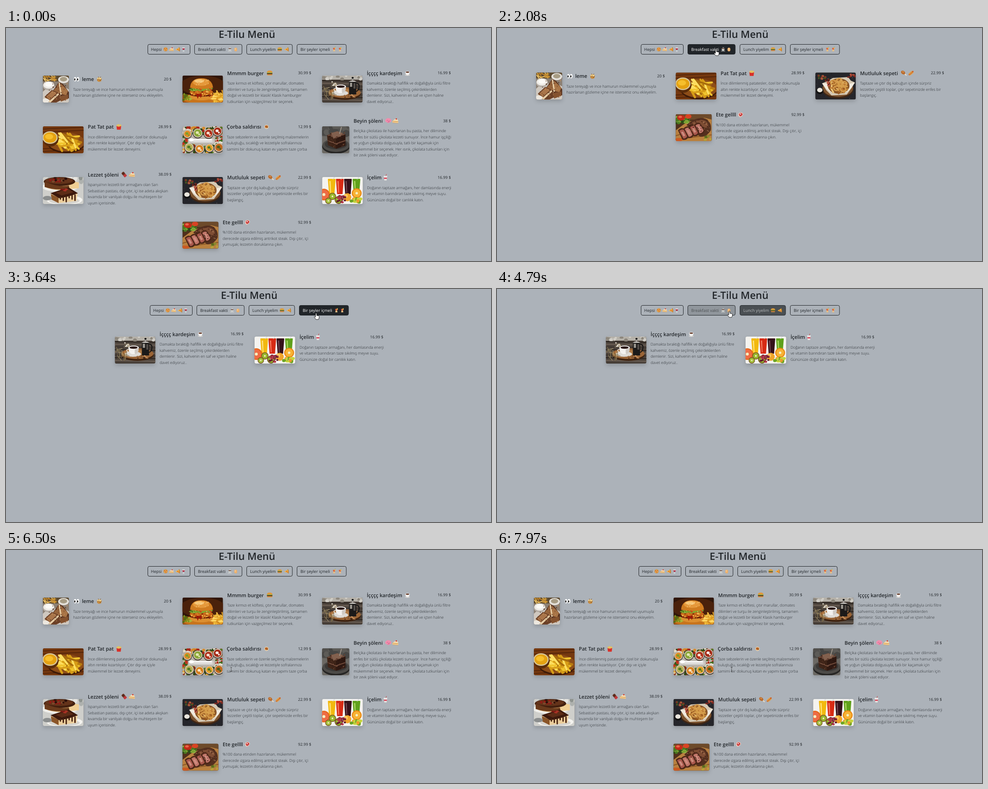
Animation of 1079x519 px, one loop 8 s. Source, as an HTML page:

```html
<!DOCTYPE html>
<html lang="tr">
<head>
<meta charset="utf-8">
<title>Menü</title>
<style>
html, body { margin: 0; width: 100%; height: 100%; overflow: hidden; background: #acb2b9; }
svg { display: block; }
text { font-family: "Open Sans", "Noto Sans", sans-serif; fill: #212529; text-rendering: geometricPrecision; }
.title { font-size: 22.4px; font-weight: 600; text-anchor: middle; }
.name { font-size: 11.2px; font-weight: 600; }
.price { font-size: 8.7px; text-anchor: end; }
.line { font-size: 8.53px; font-weight: 300; }
.btn { font-size: 9px; }
.shadow { filter: drop-shadow(0 4.5px 4.5px rgba(0, 0, 0, .17)); }
</style>
</head>
<body>
<svg id="stage" width="1079" height="519" viewBox="0 0 1079 519"></svg>
<script>
const LOOP = 8000, INK = [33, 37, 41];
const $ = id => document.getElementById(id);

// Shape helpers
const E = (x, y, rx, ry, c) => `<ellipse cx="${x}" cy="${y}" rx="${rx}" ry="${ry}" fill="${c}"/>`;
const R = (x, y, w, h, c, r = 0) => `<rect x="${x}" y="${y}" width="${w}" height="${h}" rx="${r}" fill="${c}"/>`;
const P = (d, c) => `<path d="${d}" fill="${c}"/>`;
const S = (d, c, w) => `<path d="${d}" fill="none" stroke="${c}" stroke-width="${w}" stroke-linecap="round"/>`;
const rng = s => () => (s = (s * 16807) % 2147483647) / 2147483647;

function dots(n, x, y, w, h, r, colors, seed) {
  const rnd = rng(seed * 7919);
  let out = '';
  for (let i = 0; i < n; i++)
    out += E((x + rnd() * w).toFixed(1), (y + rnd() * h).toFixed(1), r * (.6 + rnd() * .6), r * (.5 + rnd() * .5), colors[i % colors.length]);
  return out;
}
// Short bars centred in a box, turned between angles a and b
function sticks(n, x, y, w, h, len, colors, width, seed, a = -.5, b = 1.9) {
  const rnd = rng(seed * 7919);
  let out = '';
  for (let i = 0; i < n; i++) {
    const turn = a + rnd() * (b - a), dx = Math.cos(turn) * len, dy = Math.sin(turn) * len;
    out += S(`M${(x + rnd() * w - dx / 2).toFixed(1)} ${(y + rnd() * h - dy / 2).toFixed(1)}l${dx.toFixed(1)} ${dy.toFixed(1)}`, colors[i % colors.length], width);
  }
  return out;
}
const bowl = (x, y, r, c, top) => E(x, y + 1, r + 1, r + 1, '#4a4038') + E(x, y, r, r, '#dcd2c4') + E(x, y, r * .84, r * .82, c) + E(x - 1, y - 1, r * .35, r * .3, top) + E(x + r * .3, y + r * .3, r * .2, r * .2, top);
const glass = (x, c, light) => P(`M${x} 6h17l-2.5 32h-12z`, c) + P(`M${x + 3} 9h3l1 26h-2z`, light) + R(x, 4, 17, 3, c, 1);
const slice = (x, y, r, rim, c) => E(x, y, r, r, rim) + E(x, y, r * .8, r * .8, c) + E(x, y, r * .25, r * .25, '#f6eec0');

const photos = {
  gozleme: R(0, 0, 58, 60, '#8c8074') + R(0, 0, 58, 13, '#5d4a30') + sticks(14, 2, 2, 24, 9, 10, ['#d9a23c', '#b9802a', '#efc568'], 2, 3) +
    E(32, 46, 36, 22, '#cfc8bf') + E(13, 23, 13, 10, '#b5aea6') + E(13, 21, 12, 8, '#eeebe6') + E(13, 20, 8, 5, '#fbfaf6') + E(46, 9, 12, 8, '#e4e0da') + E(46, 8, 8, 5, '#a79c84') +
    P('M18 40l18-26 9 5 13 18v14z', '#5a3420') + P('M22 36l14-20 4 18-8 12z', '#96643c') + P('M40 18l16 16-4 10-14-4z', '#a87446') + P('M35 15l3 1 4 26-3 1z', '#ead2ac') +
    P('M4 47l16-15 14 6 8 16-16 8-16-4z', '#6d4127') + P('M7 47l14-13 10 5-16 15z', '#a9754a') + P('M5 49l11 6 18-16 2 3-19 18-13-6z', '#e6cda6') + P('M38 46l18-4v10l-16 6z', '#84522f') +
    E(6, 56, 8, 5, '#ece7df') + dots(40, 8, 18, 46, 38, 1.3, ['#4a2a17', '#c1915f', '#7a4a2a'], 8),
  burger: R(0, 0, 90, 60, '#2f1508') + E(45, 22, 50, 22, '#4a210b') + R(0, 42, 90, 18, '#9a4f10') + E(50, 54, 50, 8, '#c8741c') + dots(16, 0, 40, 20, 14, 3, ['#7c8f1c', '#a8b53a', '#566a12'], 6) +
    sticks(40, 64, 40, 26, 16, 14, ['#f3c145', '#d9941c', '#ffd869', '#e8ac2e'], 2.8, 12) +
    E(42, 47, 25, 8, '#dc8f30') + E(42, 41, 27, 6, '#5a1c08') + E(42, 37, 26, 7, '#c8691a') + dots(34, 18, 32, 48, 13, 2.4, ['#e39a35', '#b4500f', '#f0b24c', '#8c2b0b'], 5) +
    P('M14 31q8-6 16-2 10 5 20-2 10-3 18 2-8 8-17 3-9 6-17 1-12 5-20-2z', '#83a52c') + dots(14, 16, 28, 50, 4, 1.8, ['#b9c85c', '#d23c1c', '#567a1c'], 3) +
    P('M17 27Q18 6 42 6t26 21q-25 6-51 0z', '#d07c20') + E(41, 15, 18, 8, '#e5983a') + E(37, 12, 11, 4, '#f6c270') + dots(22, 24, 9, 36, 12, .9, ['#fbe4ad'], 4) +
    P('M30 40l4 12 3-9 4 7 2-9z', '#9c1a08'),
  coffee: R(0, 0, 90, 60, '#4b423b') + R(0, 0, 90, 9, '#b5b1a9') + dots(12, 0, 0, 90, 9, 4, ['#8d877d', '#d0cdc6'], 3) +
    Array.from({ length: 9 }, (_, i) => S(`M0 ${11 + i * 6}L90 ${13 + i * 6}`, ['#2c2520', '#6f6257', '#3a322c'][i % 3], 2)).join('') +
    E(50, 41, 36, 13, '#3d2210') + E(50, 38, 36, 12, '#9a6537') + E(44, 36, 24, 7, '#b47f4a') + E(40, 39, 18, 6, '#dedbd6') + P('M30 24h23q0 14-8 15h-7q-8-2-8-15z', '#f3f1ee') + P('M45 24h8q0 14-8 15-2-3 0-15z', '#cfcac4') +
    E(41.5, 24, 11.5, 4, '#fff') + E(41.5, 24.5, 9, 2.7, '#2c1610') + S('M31 28q-6 0-4 5 2 2 5 1', '#eceae6', 1.6) +
    R(60, 14, 16, 28, '#1c1a19', 1) + R(62, 16, 5, 9, '#9a968f') + R(70, 17, 4, 12, '#56514d') + S('M68 13V4', '#aaa', 1.5) + E(68, 5, 2.4, 2, '#111') + P('M59 14q9-7 18 0z', '#c4c1bc') + S('M76 17q8 0 6 10-1 7-6 8', '#111', 2) +
    sticks(14, 4, 28, 24, 22, 14, ['#a08e5e', '#6e5d3c', '#c3b184'], 1, 7) + dots(14, 20, 13, 12, 10, 2, ['#e9e3d6', '#b8a98f', '#6d6150'], 6) + dots(18, 46, 42, 28, 7, 1.3, ['#2b160d', '#d9a26d'], 2),
  fries: R(0, 0, 91, 60, '#75380f') + [6, 13, 50, 56].map(y => S(`M0 ${y}L91 ${y - 4}`, '#4b2008', 1.6)).join('') + E(52, 37, 42, 23, '#3f1b08') + E(52, 35, 41, 21, '#8d4d18') +
    sticks(40, 36, 26, 38, 20, 24, ['#b97c10', '#d79d17', '#e8b822'], 5, 21, -.5, 1.3) + sticks(30, 38, 22, 36, 22, 24, ['#f1c52e', '#a86c0c', '#ffe062', '#d79d17'], 4.2, 25, -.5, 1.3) +
    E(17, 28, 18, 17, '#5a2c0b') + E(16, 25, 17, 14, '#d8c79a') + E(16, 25, 14.5, 11.5, '#e5a212') + E(14, 23, 9, 6, '#f6bf2c'),
  soups: R(0, 0, 89, 60, '#b9b4ac') + dots(70, 0, 0, 89, 18, 4, ['#4f7a22', '#a9281a', '#274415', '#d58b2c', '#e2d9c8'], 9) + dots(70, 0, 42, 89, 18, 4, ['#87301a', '#5b8425', '#e0a23b', '#2f4b18', '#d9cfbd'], 11) +
    dots(24, 0, 20, 10, 22, 3, ['#36591a', '#c2321e', '#7f9a34'], 13) + dots(24, 74, 22, 15, 22, 3, ['#b12c1d', '#436b1e', '#ece6d8'], 14) +
    bowl(11, 17, 9, '#dd8c27', '#7a9e2c') + bowl(34, 15, 10, '#8ba83a', '#e3e7b2') + bowl(58, 16, 10, '#b0321c', '#f4dfd0') + bowl(78, 11, 10, '#a42a16', '#f6efe8') +
    bowl(15, 47, 10, '#b9b05c', '#4f7a22') + bowl(38, 50, 10, '#d67f1f', '#f3e2c4') + bowl(60, 48, 9, '#e4a22d', '#4f7a22') + bowl(81, 47, 10, '#c26a1e', '#4a621b') +
    R(14, 28, 56, 9, '#cfccc8') + R(16, 28.5, 50, 3, '#fcfcfc', 1.5) + R(24, 33, 42, 2, '#e4e4e4', 1) + E(20, 30, 6, 3.4, '#fff'),
  cake: R(0, 0, 61, 60, '#6b6863') + R(0, 0, 61, 22, '#514f4c') + dots(12, 0, 0, 61, 16, 8, ['#5d5b57', '#474644'], 5) + E(31, 45, 31, 16, '#262524') + E(31, 42, 30, 15, '#4d4b48') + E(31, 40, 25, 11, '#3a3836') +
    P('M11 20l22-9 19 7v25l-21 7-18-8z', '#3e2418') + P('M11 20l22-9 19 7-21 9z', '#6d4a3a') + P('M31 27l21-9v25l-21 7z', '#2f1912') + S('M13 32l18 7 20-7', '#7d5544', 1.8) +
    dots(46, 14, 14, 36, 32, 1.4, ['#2a140c', '#68432f', '#4d2d20'], 16) + P('M20 15l14-4 12 4-6 8-8-1-6 6z', '#82604e') + S('M43 2l-4 14', '#9a9287', 2),
  cheesecake: R(0, 0, 91, 60, '#cfcfcb') + dots(16, 0, 0, 91, 13, 7, ['#e6e5e0', '#aeb1ae', '#8f9490'], 4) + E(38, 22, 40, 11, '#efeeea') + P('M4 10h68v12q-34 14-68 0z', '#d9ab6c') + P('M58 8l22 4v13l-22 2z', '#f0cf94') +
    E(37, 10, 35, 10, '#43200f') + E(36, 8, 31, 7, '#64331a') + P('M4 10q32 14 54 9l1 6q-30 6-55-3z', '#6a3a1c') + dots(14, 12, 1, 40, 9, 3, ['#8e1d16', '#2d1009', '#7c4a2c'], 18) +
    E(48, 51, 40, 11, '#f4f3ef') + E(48, 53, 34, 7, '#d6d4cf') + P('M18 38l42-10 17 9-2 16-40 5-14-8z', '#ecce9c') + P('M18 38l17 8v12l-16-8z', '#8a5528') + P('M17 36l40-13 21 13q-22 9-42 11z', '#3c190d') + P('M28 35l28-9 12 8-26 7z', '#5c2c17') +
    Array.from({ length: 6 }, (_, i) => S(`M${39 + i * 6.5} ${45 - i}v${4 + i % 3 * 4}`, '#45200f', 3)).join('') + dots(6, 40, 25, 14, 5, 3, ['#7c1a14', '#a83224'], 9) + E(10, 47, 10, 5, '#8b8e8e'),
  basket: R(0, 0, 90, 60, '#25252a') + dots(50, 0, 0, 90, 60, .9, ['#6b6769', '#3a393d', '#151518'], 23) + E(50, 37, 35, 21, '#3f2615') + E(50, 35, 34, 19, '#7d5430') + P('M15 24l10-4 14-8 34-2 6 8 9 4-8 13-10 14-34 2-12-12z', '#d5c9b4') +
    P('M15 24l13 0 6 20-10-8zM88 22l-12 3-8 20 12-10z', '#f2ebdf') + E(52, 30, 24, 17, '#8a5526') + sticks(46, 36, 18, 32, 24, 11, ['#d7a04a', '#9a5a20', '#ebc377', '#c07d34'], 3.4, 27) +
    [[40, 22], [53, 18], [64, 25], [47, 35], [62, 37]].map(([x, y]) => `<ellipse cx="${x}" cy="${y}" rx="6" ry="5" fill="none" stroke="#d39a4a" stroke-width="3"/>`).join('') +
    dots(12, 22, 14, 10, 16, 2.6, ['#8d3223', '#b85843', '#5a1d14'], 2) + E(10, 41, 8, 7, '#111') + E(10, 39, 6, 5, '#e8e4dc') + dots(12, 6, 6, 18, 9, 2.6, ['#803023', '#4a5a22', '#a5563a'], 7) + dots(8, 72, 2, 16, 8, 2.6, ['#7a2a22', '#b54c38'], 6),
  juice: R(0, 0, 91, 60, '#f4f3ef') + glass(13, '#f2b90f', '#ffe27a') + glass(31, '#d72a14', '#f47a5f') + glass(49, '#35111a', '#704450') + glass(68, '#5fa01b', '#a7d45c') + S('M24 5L28 0M42 5l4-5M78 5l4-5', '#cfd6d2', 1.2) +
    slice(4, 39, 13, '#e6691d', '#ee6c45') + slice(23, 43, 8, '#7c5a24', '#98b82d') + slice(37, 51, 9, '#77531f', '#8fb42b') + slice(14, 53, 7, '#77531f', '#a3bf3b') + E(56, 45, 9, 9, '#f1a42a') + E(53, 42, 4, 4, '#f9cb61') + slice(77, 36, 11, '#e98713', '#f8b334') +
    dots(26, 34, 42, 18, 14, 2.6, ['#631b2c', '#87283c', '#b5384a'], 15) + dots(18, 65, 48, 22, 9, 4, ['#c7d43d', '#6da424', '#ef9a2a'], 31),
  steak: R(0, 0, 80, 60, '#4f301c') + R(0, 0, 80, 12, '#6d4a2a') + P('M0 36l24-18 40-10 16 4v48H0z', '#b9803f') + S('M0 56l80-10M0 48l20-6', '#8a5726', 2) +
    dots(34, 0, 6, 30, 14, 4, ['#4b7a20', '#78a22f', '#2d4b15', '#93b54a'], 19) + E(12, 8, 9, 6, '#c22a17') + E(28, 5, 7, 5, '#d84423') + E(10, 6, 4, 2.5, '#e8664a') +
    P('M24 24Q46 4 66 10q15 8 12 26-10 16-24 14z', '#54301f') + P('M34 20q18-11 30-6 10 5 8 16-18 2-38-10z', '#7d4c33') +
    [0, 1, 2, 3].map(i => { const x = 5 + i * 12, y = 36 - i * 4; return P(`M${x} ${y}q8-8 14-3l10 15q-2 11-14 9z`, '#4e2819') + P(`M${x + 3} ${y + 1}q6-5 10-2l8 13q-3 7-9 6z`, i % 2 ? '#c0766a' : '#a9584d') + P(`M${x + 7} ${y + 4}q4-2 5 0l4 7q-2 3-4 2z`, '#cf8d80'); }).join('') +
    dots(50, 30, 12, 46, 28, 1.2, ['#85533a', '#2f130d', '#b98a62', '#3f2015'], 33) + dots(8, 62, 48, 16, 10, 3.5, ['#8c8a2f', '#b9a03c', '#5c6a1e'], 4) + E(6, 57, 9, 4, '#cb5a22')
};

// Small food icons on a 12 unit box
const icons = {
  eyes: [-3, 3].map(x => E(x, 0, 2.7, 4.6, '#fff') + E(x - .8, .5, 1.4, 2.4, '#222')).join(''),
  wrap: P('M-5-1q5-6 10 0l-1 5q-4 3-8 0z', '#c88b3f') + E(0, -1.5, 4.3, 2.4, '#f0d28d') + S('M-4 2l3-3 3 4 2-3M-2-5l1 2M3-5l-1 2', '#7b4a1c', .9),
  burger: P('M-6-1q0-4.5 6-4.5t6 4.5z', '#e09a3c') + R(-6, -1, 12, 1.5, '#6fa32e', .7) + R(-6, .5, 12, 2, '#68301a', 1) + R(-5.5, 2.5, 11, 2.3, '#dd9b45', 1),
  coffee: E(0, 4.3, 5.5, 1.4, '#d2d0cd') + P('M-4.5-2h9q0 6-4.5 6.5-4.5-.5-4.5-6.5z', '#f2f0ee') + E(0, -2, 4.5, 2, '#fff') + E(0, -2, 3.6, 1.4, '#5b2e1b'),
  fries: S('M-3.5-4v4M-1-5v5M1.5-4.5v5M4-4v4', '#f6c744', 1.8) + P('M-5-2q5 3 10 0l-1 8h-8z', '#d92f29'),
  soup: E(0, 0, 4.6, 4.5, '#e7d3b5') + E(0, -.3, 3.5, 3, '#c87b35') + E(-1, -1, 1.2, 1, '#8c2f1c') + E(1.5, .5, 1, .8, '#5d3516'),
  brain: P('M-5.5 2q-2-4 1-5.5 2-3 5.5-2 4 0 5.5 4 1 4.5-3 4.5l-3 2z', '#f08fae') + S('M-3 0q2-3 3 0t4-1M-1 3l4-1', '#c95f86', .8),
  cake: P('M-6 0l8-5 4 4v2z', '#f8e0b6') + P('M-6 0l12 1v4l-12-1z', '#e0a24e') + S('M-6 2.2l12 1', '#fbe9c6', 1.1) + E(2, -4, 1.5, 1.5, '#d43a2c'),
  choc: `<g transform="rotate(-40)">${R(-3, -6, 6, 11, '#6a3422', 1)}${R(-3, 0, 6, 5.5, '#c4393c')}${S('M0-5.5v5M-3-3h6', '#42190e', .7)}</g>`,
  drum: S('M1 1l4 3.5', '#f1e2c7', 1.8) + `<g transform="rotate(35)">${E(-2, 0, 4.8, 3.5, '#b86b2e')}${E(-3, -1, 2, 1.2, '#dc9450')}</g>`,
  dog: `<g transform="rotate(-40)">${R(-6, -2.7, 12, 5.6, '#dea24c', 2.7)}${R(-6.5, -1.2, 13, 2.2, '#bf4e2d', 1)}${S('M-5 0l2-1 2 1 2-1 2 1', '#f5d24e', .7)}</g>`,
  cup: S('M1-4l1-3', '#c33', .9) + P('M-3.5-2h7l-1 8h-5z', '#ece7e4') + R(-3.1, 0, 6.2, 2.8, '#d9485c') + R(-4, -3.5, 8, 1.8, '#f3efed', .7),
  steak: P('M-5-1q1-4 6-4 5 2 4 5-3 5-7 5-4-3-3-6z', '#f2d2c2') + P('M-3.5-1q1-3 4-3 4 1 3.5 4-2.5 3.5-5 3.5-3-2-2.5-4.5z', '#c93f3f') + E(-.5, -1.5, 1.3, 1.1, '#fff'),
  pizza: E(0, 0, 5.5, 5.5, '#c9843a') + E(0, 0, 4.2, 4.2, '#f0bb51') + E(-2, -1, 1.3, 1.3, '#b4392a') + E(2, -1.5, 1.2, 1.2, '#b4392a') + E(.5, 2.2, 1.3, 1.3, '#b4392a'),
  slice: P('M-6 1l10-6q2 5 1 10z', '#f3b63d') + S('M4-5q2 5 1 10', '#b87830', 1.8) + E(0, 0, 1.2, 1.2, '#c33d2b') + E(2.5, 2, 1, 1, '#c33d2b'),
  wine: S('M0 1v4M-2 5.5h4', '#eee', 1) + P('M-3.4-5h6.8q.5 6-3.4 6.5-3.9-.5-3.4-6.5z', '#e8dddd') + P('M-3.4-2.5h6.8q-.2 3.7-3.4 4-3.2-.3-3.4-4z', '#a8203a'),
  mug: P('M-4-2h8l-1 6h-6z', '#c9ccca') + E(0, -2, 4, 1.3, '#76574a') + S('M-5 5h10M-1-5.5l1 2M2-5.5l-1 2', '#e5e5e0', .9),
  egg: E(0, .5, 4, 5.1, '#edb06b') + E(-1, -1, 1.6, 2, '#f6cb94'),
  drink: S('M1-4l2-2.5', '#5b8b3a', .9) + P('M-3.3-4h6.6l-1 5h-4.6z', '#d9643f') + P('M-2.3 1h4.6l.6 4.5h-5.8z', '#e8bd83') + E(2.5, -3.5, 1.7, 1.7, '#f2c054')
};
const icon = (id, x, y, k) => `<g transform="translate(${x} ${y}) scale(${k})">${icons[id]}</g>`;

// photo, width, name, price, icons with x, text lines, optional name x
const cards = [
  ['gozleme', 58, 'leme', '20 $', [['eyes', 75], ['wrap', 125.5]], 'Taze tereyağı ve ince hamurun mükemmel uyumuyla|hazırlanan gözleme içine ne isterseniz onu ekleyelim.', 87],
  ['burger', 90, 'Mmmm burger', '30.99 $', [['burger', 194]], 'Taze kırmızı et köftesi, çıtır marullar, domates|dilimleri ve turşu ile zenginleştirilmiş, tamamen|doğal ve lezzetli bir klasik! Klasik hamburger|tutkunları için vazgeçilmez bir seçenek.'],
  ['coffee', 90, 'İçççç kardeşim', '16.99 $', [['coffee', 190]], 'Damakta bıraktığı hafiflik ve doğallığıyla ünlü filtre|kahvemiz, özenle seçilmiş çekirdeklerden|demlenir. Sizi, kahvenin en saf ve içten haline|davet ediyoruz..'],
  ['fries', 90.5, 'Pat Tat pat', '28.99 $', [['fries', 169]], 'İnce dilimlenmiş patatesler, özel bir dokunuşla|altın renkte kızartılıyor. Çıtır dışı ve içiyle|mükemmel bir lezzet deneyimi.'],
  ['soups', 89, 'Çorba saldırısı', '12.99 $', [['soup', 187]], 'Taze sebzelerin ve özenle seçilmiş malzemelerin|buluştuğu, sıcaklığı ve lezzetiyle sofralarınıza|samimi bir dokunuş katan ev yapımı taze çorba'],
  ['cake', 60.5, 'Beyin şöleni', '38 $', [['brain', 147], ['cake', 163]], 'Belçika çikolatası ile hazırlanan bu pasta, her diliminde|enfes bir sütlü çikolata lezzeti sunuyor. İnce hamur işçiliği|ve yoğun çikolata dolgusuyla, tatlı bir kaçamak için|mükemmel bir seçenek. Her ısırık, çikolata tutkunları için|bir zevk şöleni vaat ediyor.'],
  ['cheesecake', 90.5, 'Lezzet şöleni', '38.09 $', [['choc', 181], ['cake', 198]], "İspanya'nın lezzetli bir armağanı olan San|Sebastian pastası, dışı çıtır, içi ise adeta akışkan|kıvamda bir vanilyalı dolgu ile muhteşem bir|uyum içerisinde."],
  ['basket', 90, 'Mutluluk sepeti', '22.99 $', [['drum', 197], ['dog', 213]], 'Taptaze ve çıtır dış kabuğun içinde sürpriz|lezzetler çeşitli toplar, çıtır sepetinizde enfes bir|başlangıç.'],
  ['juice', 90.5, 'İçelim', '16.99 $', [['cup', 141]], 'Doğanın taptaze armağanı, her damlasında enerji|ve vitamin barındıran taze sıkılmış meyve suyu.|Gününüze doğal bir canlılık katın.'],
  ['steak', 80, 'Ete gellll', '92.99 $', [['steak', 144.5]], '%100 dana etinden hazırlanan, mükemmel|derecede ızgara edilmiş antrikot steak. Dışı çıtır, içi|yumuşak; lezzetin doruklarına çıkın.']
].map(([photo, w, name, price, marks, text, nameX = w + 9.5]) => ({ photo, w, name, price, marks, lines: text.split('|'), nameX }));

const buttons = [
  [315.5, 94, 'Hepsi', 322.5, [['pizza', 355], ['cake', 368], ['slice', 382], ['wine', 395]]],
  [419.5, 105.5, 'Breakfast vakti', 427, [['mug', 498], ['egg', 511]]],
  [535.5, 101.5, 'Lunch yiyelim', 543, [['burger', 609], ['slice', 624]]],
  [647.5, 109.5, 'Bir şeyler içmeli', 655, [['drink', 730], ['drink', 743]]]
];

const all = cards.map((_, i) => i);
const views = [[0, all], [1610, [0, 3, 7, 9]], [2560, [1, 4, 5, 6]], [3640, [2, 8]], [5260, all]];
// start, end, target x, target y of each pointer move
const moves = [[390, 1200, 463, 46], [1940, 2400, 571, 54], [2750, 3180, 690, 54], [4440, 5120, 360, 45], [5730, 6500, 501, 266], [6620, 7360, 522, 266]];
const clicks = [[1400, 1610], [2430, 2560], [3440, 3640], [5130, 5260]];

function cardMarkup(c, i) {
  const top = 14 - 6.75 * c.lines.length, nameY = top - 22.5;
  return `<g id="card${i}"><clipPath id="clip${i}">${R(0, 0, c.w, 60, '#000', 3.4)}</clipPath>
    <g transform="translate(0 -30)"><g class="shadow">${R(0, 0, c.w, 60, '#777', 3.4)}</g><g clip-path="url(#clip${i})">${photos[c.photo]}</g></g>
    <text class="name" x="${c.nameX}" y="${nameY + 4}">${c.name}</text><text class="price" x="286.5" y="${nameY + 2.8}">${c.price}</text>
    ${c.marks.map(([id, x]) => icon(id, x, nameY, 1.05)).join('')}
    ${c.lines.map((s, k) => `<text class="line" x="${c.w + 9.5}" y="${top + k * 13.5 + 3}">${s}</text>`).join('')}</g>`;
}
const buttonMarkup = ([x, w, label, tx, marks], i) =>
  `<rect id="box${i}" x="${x}" y="36.5" width="${w}" height="22" rx="3.4" stroke="#212529"/><text class="btn" id="label${i}" x="${tx}" y="50.8">${label}</text>` +
  marks.map(([id, mx]) => icon(id, mx, 47.5, .82)).join('');

const hand = 'M-1.2 .6q1.2-1.8 2.4 0v4.2l4.3 1q1.6.5 1.4 2l-.8 4.2-1 1.9h-5.5l-3.7-5q-.6-1.6.9-1.6l2 1.5z';
$('stage').innerHTML = R(0, 0, 1079, 519, '#acb2b9') +
  `<g id="top"><text class="title" x="536" y="21.5">E-Tilu Menü</text>${buttons.map(buttonMarkup).join('')}</g>` +
  cards.map(cardMarkup).join('') +
  `<g id="pointer"><circle id="ring" r="7.5" fill="#e6d200" opacity=".75"/>
    <g id="hand"><path d="${hand}" fill="#fff" stroke="#111" stroke-width=".9"/></g>
    <g id="arrow"><path d="M0 0v11l2.6-2.4 1.8 4 1.7-.8-1.8-3.8h3.5z" fill="#fff" stroke="#111" stroke-width=".8"/></g>
    <g id="beam">${S('M-1.6-4.5h3.2M-1.6 4.5h3.2M0-4.5v9', '#333', .7)}</g></g>`;

const show = (id, on) => $(id).setAttribute('display', on ? 'inline' : 'none');
const place = (id, x, y) => $(id).setAttribute('transform', `translate(${x} ${y})`);
const viewAt = t => views.filter(v => v[0] <= Math.max(t, 0)).pop()[1];
const shiftOf = view => view === all ? 0 : 5;

function pointerAt(t) {
  let p = [1036, 535];
  for (const [a, b, x, y] of moves) {
    if (t <= a) break;
    const u = Math.min(1, (t - a) / (b - a)), k = u * u * (3 - 2 * u);
    p = [p[0] + (x - p[0]) * k, p[1] + (y - p[1]) * k];
  }
  return p;
}

function hovered(t) {
  const [x, y] = pointerAt(t), dx = shiftOf(viewAt(t));
  return buttons.findIndex(([bx, w]) => x > bx + dx && x < bx + dx + w && y > 36 && y < 59);
}

// Rows of three, last row centred, row height set by its longest text
function layout(view) {
  const out = [];
  let y = 0, prev = 0;
  for (let i = 0; i < view.length; i += 3) {
    const row = view.slice(i, i + 3), n = Math.max(...row.map(c => cards[c].lines.length));
    y = i ? y + 113 + (n + prev - 9) * 6.75 : 136 + (n - 4) * 6.75;
    prev = n;
    row.forEach((c, k) => out.push({ c, x: 82 + shiftOf(view) + ((3 - row.length) / 2 + k) * 310.6, y }));
  }
  return out;
}

const mix = (a, b, k) => `rgb(${a.map((v, i) => Math.round(v + (b[i] - v) * k))})`;

function draw(t) {
  const view = viewAt(t), spots = layout(view), [x, y] = pointerAt(t), over = hovered(t);
  place('top', shiftOf(view), 0);
  all.forEach(i => show('card' + i, view.includes(i)));
  spots.forEach(s => place('card' + s.c, s.x, s.y));

  const recent = Array.from({ length: 10 }, (_, k) => hovered(t - k * 15));
  buttons.forEach((_, i) => {
    const k = recent.filter(h => h === i).length / 10;
    $('box' + i).setAttribute('fill', `rgba(${INK},${k})`);
    $('label' + i).style.fill = mix(INK, [255, 255, 255], k);
  });

  const onText = spots.some(s => x > s.x + cards[s.c].w + 9 && x < s.x + 287 && Math.abs(y - s.y) < 13 + 6.75 * cards[s.c].lines.length);
  show('hand', over >= 0);
  show('beam', over < 0 && onText);
  show('arrow', over < 0 && !onText);
  show('ring', clicks.some(([a, b]) => t >= a && t < b));
  place('pointer', x, y);
}

function tick() {
  draw(performance.now() % LOOP);
  requestAnimationFrame(tick);
}
tick();
</script>
</body>
</html>
```
